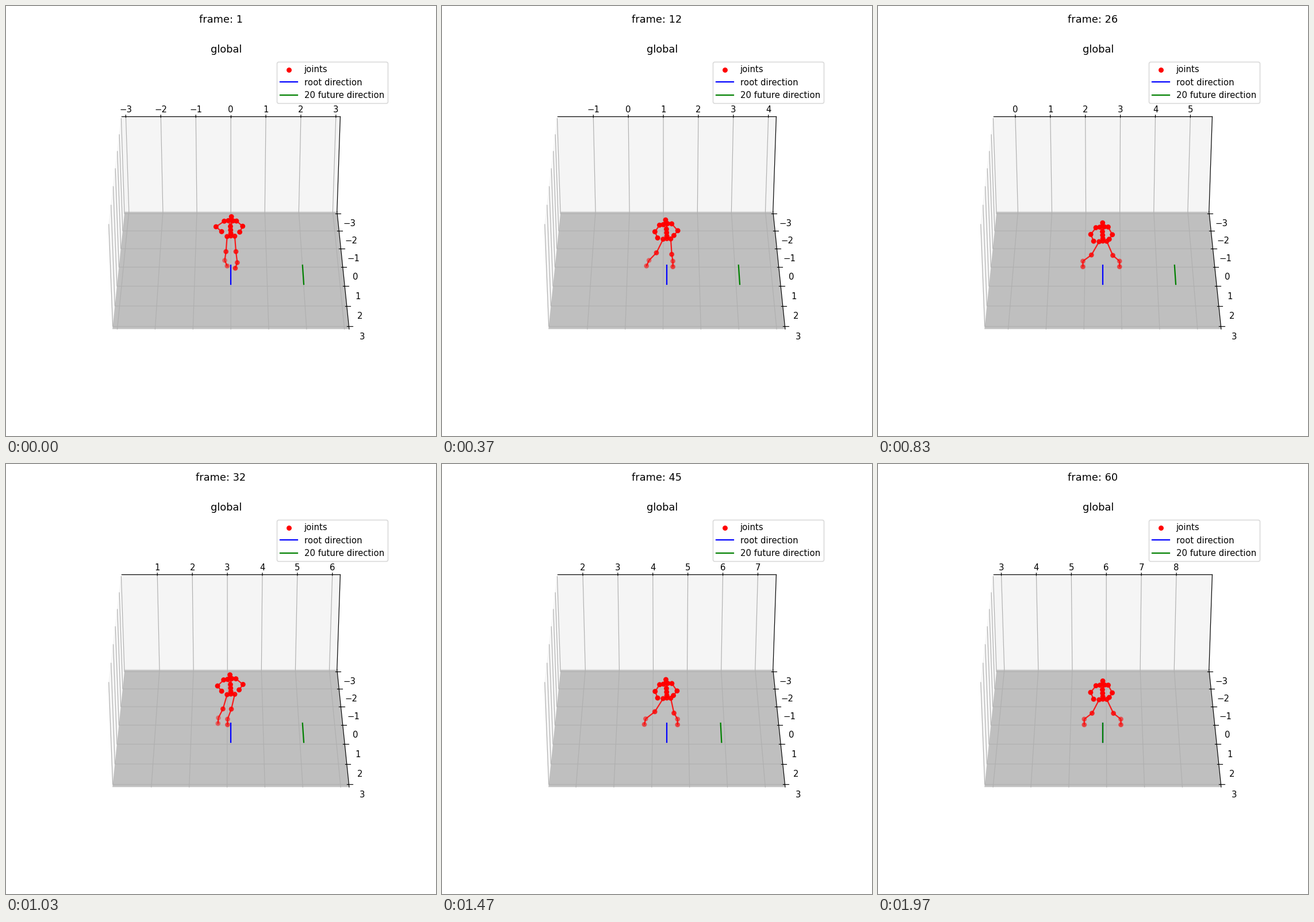
Write a matplotlib script that moves like this. It is 748x748 px and loops after 2.01 s.

```python
import numpy as np
import matplotlib.pyplot as plt
from matplotlib.animation import FuncAnimation
from matplotlib.patches import Polygon

SIZE, INCHES = 748, 7
STEPS, TICK_MS, LOOP_MS = 60, 10, 2010
SPEED, LOOKAHEAD = 0.1, 20

# Camera: 30 degrees above the floor, ten units away
SCALE = 0.77 * SIZE / 0.185
UNIT = 1.82946 / 1.5 / 6
SIN, COS = 0.5, np.sqrt(0.75)
EDGE, LOW, HIGH = 3.125, -0.0625, 3.0625

# Side-step gait, in pixels and animation steps
PERIOD, SLIDE = 17.2, 5.8


def project(x, y, z):
    """Scene point (x right, y up, z towards the viewer) to pixels from the view centre."""
    y = y - 1.5
    depth = 10 - UNIT * (SIN * y + COS * z)
    k = SCALE * UNIT / depth
    return k * x, k * (COS * y - SIN * z)


def path(*points):
    return np.array([project(*p) for p in points]).T


def foot(step, land, start, stance, lift):
    """Ankle and toe: planted while the body moves on, then swung back with easing."""
    s = (step - land) % PERIOD
    end = start - SLIDE * stance
    if s < stance:
        swing, x = 0, start - SLIDE * s
    else:
        swing = (s - stance) / (PERIOD - stance)
        x = end + (start - end) * swing ** 2 * (3 - 2 * swing)
    y = 83.6 + lift * np.sin(np.pi * swing)
    return (x + 4.5 * np.sin(2 * np.pi * swing), y - 9.7), (x, y)


def knee(hip, ankle, pelvis_y):
    spread = ankle[0] - hip[0]
    return hip[0] + 0.475 * spread, pelvis_y + 27.8 - 0.13 * abs(spread)


def skeleton(step):
    """Joints in pixels right of and below the view centre."""
    def wave(mean, swing, peak):
        return mean + swing * np.cos(2 * np.pi * (step - peak) / PERIOD)

    p = wave(34.2, 5, 7)
    sway = wave(0, 2.2, 3)
    squat = 0.2 * (p - 34)
    head_y = p - 32.7 + squat
    left_y = p - 24.5 + squat - 0.4 * sway
    right_y = p - 25.4 + squat + 0.25 * sway
    joints = {
        "pelvis": (0, p), "hip_l": (-6.5, p + 1), "hip_r": (6.8, p + 0.4),
        "spine1": (0, p - 4.3), "spine2": (-0.4, p - 10.3), "spine3": (-0.7, p - 16.5),
        "neck": (0.8 * sway, head_y + 5.7), "head": (sway, head_y),
        "collar_l": (-5 + 0.6 * sway, left_y - 0.9),
        "collar_r": (3 + 0.8 * sway, right_y - 0.3),
        "shoulder_l": (-11.9 + 0.4 * sway, left_y),
        "shoulder_r": (9.4 + 0.4 * sway, right_y),
        "elbow_l": (wave(-23.2, 2.8, 9.6), p + wave(-13.7, 2.3, 9)),
        "elbow_r": (wave(18.8, 2.6, 15), p + wave(-14.2, 3.2, 7)),
        "wrist_l": (-16, p + wave(-3.6, 3.9, 8.5)),
        "wrist_r": (wave(13.3, 2.2, 16.6), p + wave(-5.2, 2.3, 6.3)),
    }
    joints["ankle_l"], joints["toe_l"] = foot(step, 2.2, -2.2, 6.5, -2.2)
    joints["ankle_r"], joints["toe_r"] = foot(step, 6, 39.5, 7.8, 2.8)
    for side in "lr":
        joints["knee_" + side] = knee(joints["hip_" + side], joints["ankle_" + side], p)
    return {name: (x, -y) for name, (x, y) in joints.items()}


def shade(name, y):
    """Opacity by distance from the camera."""
    part = name.split("_")[0]
    if part == "ankle":
        return np.clip(0.42 + 0.06 * (-y - 73.5), 0.3, 0.7)
    if part == "toe":
        return np.clip(0.5 + 0.06 * (-y - 83.5), 0.35, 0.7)
    return {"knee": 0.7, "hip": 0.86, "pelvis": 0.86}.get(part, 0.96)


LEG = "pelvis hip_{0} knee_{0} ankle_{0} toe_{0}"
ARM = "spine3 collar_{0} shoulder_{0} elbow_{0} wrist_{0}"
BONES = [chain.format(side).split() for chain in (LEG, ARM) for side in "lr"]
BONES.append("pelvis spine1 spine2 spine3 neck head".split())

fig = plt.figure(figsize=(INCHES, INCHES), dpi=SIZE / INCHES, facecolor="white")
ax = fig.add_axes([0.1275, 0.11, 0.77, 0.77])
ax.set_xlim(-0.095 * SCALE, 0.09 * SCALE)
ax.set_ylim(-0.095 * SCALE, 0.09 * SCALE)
ax.axis("off")
ax.set_title("global")
title = fig.suptitle("")


def pane(face, edge, *corners):
    ax.add_patch(Polygon(path(*corners).T, closed=False, facecolor=(face,) * 3 + (0.5,),
                         edgecolor=(edge,) * 3 + (0.5,), linewidth=1, zorder=0))


def stroke(points=None, color="black", width=0.8, **kw):
    x, y = path(*points) if points else ([], [])
    return ax.plot(x, y, color=color, lw=width, **kw)[0]


def number(value):
    return str(value).replace("-", "\u2212")


def label(x, y, value=""):
    return ax.text(x, y, number(value), fontsize=10, ha="center", va="center")


pane(0.95, 0.95, (-EDGE, LOW, -EDGE), (-EDGE, LOW, EDGE),
     (-EDGE, HIGH, EDGE), (-EDGE, HIGH, -EDGE))
pane(0.5, 0.9, (-EDGE, LOW, -EDGE), (EDGE, LOW, -EDGE),
     (EDGE, LOW, EDGE), (-EDGE, LOW, EDGE))
pane(0.925, 0.925, (-EDGE, LOW, -EDGE), (EDGE, LOW, -EDGE),
     (EDGE, HIGH, -EDGE), (-EDGE, HIGH, -EDGE))

GRID = dict(color="#b0b0b0", zorder=1, snap=False)
columns = [(stroke(**GRID), stroke(zorder=2), label(0, 0)) for _ in range(7)]

for z in range(-3, 4):
    stroke([(-EDGE, HIGH, z), (-EDGE, LOW, z), (EDGE, LOW, z)], **GRID)
    stroke([(EDGE - 0.05, LOW, z), (EDGE + 0.1, LOW, z)], zorder=2)
    label(*project(EDGE + 0.367, LOW - 0.335, z), z)

stroke([(-EDGE, HIGH, -EDGE), (EDGE, HIGH, -EDGE)], zorder=2)
stroke([(EDGE, HIGH, -EDGE), (EDGE, LOW, -EDGE)], zorder=2)
stroke([(EDGE, LOW, -EDGE), (EDGE, LOW, EDGE)], zorder=2)

root = stroke([(0, 0, 0), (0, 0, 1)], "blue", 1.5, zorder=3, label="root direction")
future = stroke(color="green", width=1.5, zorder=3,
                label=f"{LOOKAHEAD} future direction")
limbs = [stroke(color="red", width=1.5, alpha=0.85, zorder=4) for _ in BONES]
dots = ax.scatter([], [], s=20, linewidths=1.5, zorder=5)
key_dot = ax.scatter([], [], s=20, color="red", linewidths=1.5, label="joints")
ax.legend(handles=[key_dot, root, future], loc="upper right")


def draw_columns(centre):
    first = int(np.ceil(centre - 3 - 1e-6))
    for n, (line, tick, text) in enumerate(columns):
        x = first + n - centre
        shown = x <= 3 + 1e-6
        for artist in (line, tick, text):
            artist.set_visible(shown)
        if shown:
            line.set_data(*path((x, HIGH, -EDGE), (x, LOW, -EDGE), (x, LOW, EDGE)))
            tick.set_data(*path((x, HIGH + 0.05, -EDGE), (x, HIGH - 0.025, -EDGE)))
            px, py = project(x, HIGH, -EDGE)
            text.set_position((px, py + 12))
            text.set_text(number(first + n))


def update(tick):
    step = min(int((tick + 0.5) * 0.3), STEPS - 1)
    title.set_text(f"frame: {step + 1}")
    draw_columns(SPEED * step)

    ahead = SPEED * (min(step + LOOKAHEAD, STEPS - 1) - step)
    future.set_data(*path((ahead, 0, 0), (ahead, 0, 1)))

    joints = skeleton(step)
    for limb, names in zip(limbs, BONES):
        limb.set_data(*np.array([joints[n] for n in names]).T)
    order = sorted(joints, key=lambda n: joints[n][1])
    colors = [(1, 0, 0, shade(n, joints[n][1])) for n in order]
    dots.set_offsets([joints[n] for n in order])
    dots.set_facecolor(colors)
    dots.set_edgecolor(colors)
    return []


anim = FuncAnimation(fig, update, frames=LOOP_MS // TICK_MS, interval=TICK_MS,
                     repeat=True, repeat_delay=0, blit=False)
plt.show()
```
